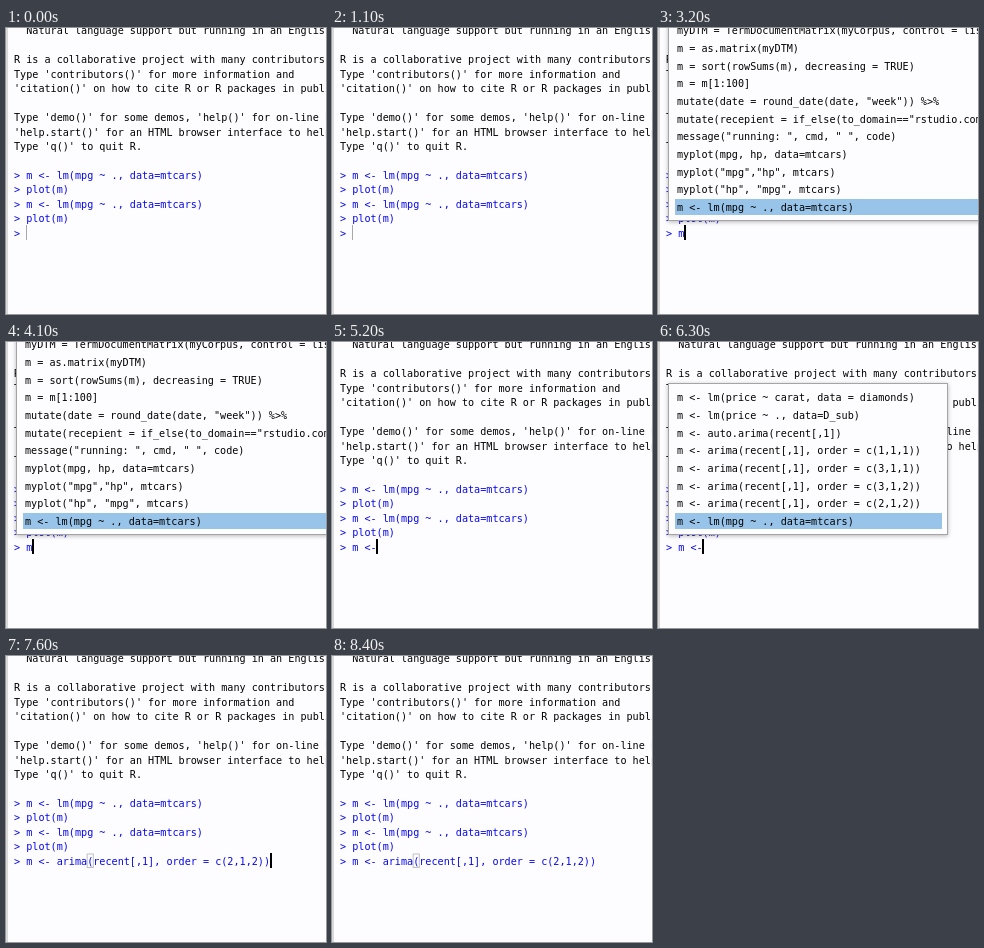
Write an HTML page that moves like this. It is 320 px wide and 286 px high and loops after 8500 ms.

```html
<!DOCTYPE html>
<html lang="en">
<head>
<meta charset="utf-8">
<title>Console history popup</title>
<style>
  html, body { margin: 0; width: 100%; height: 100%; overflow: hidden; background: #fdfdff; }
  svg { display: block; width: 320px; height: 286px; }
  text { font: 10.13px "DejaVu Sans Mono", monospace; white-space: pre; fill: #000; }
  .input { fill: #0808ee; }
  .panel { fill: #fdfdff; stroke: #a4a4a4; filter: drop-shadow(0 1px 2px rgba(0, 0, 0, .28)); }
  .selected { fill: #98c4ea; }
</style>
</head>
<body>
<svg id="stage" viewBox="0 0 320 286"></svg>
<script>
const LOOP = 8500, CHAR = 6.1, LEFT = 8, LINE = 14.45, PROMPT_Y = 208.7;
const ITEM = 17.66, LAST_ITEM_Y = 183;
const stage = document.getElementById('stage');

function add(parent, tag, attrs, content = '') {
  const node = document.createElementNS('http://www.w3.org/2000/svg', tag);
  for (const key in attrs) node.setAttribute(key, attrs[key]);
  node.textContent = content;
  parent.appendChild(node);
  return node;
}

const show = (node, visible) => { node.style.display = visible ? '' : 'none'; };

add(stage, 'rect', { width: 320, height: 286, fill: '#fdfdff' });
add(stage, 'rect', { width: 2, height: 286, fill: '#d9d9d9' });

const output = [
  '  Natural language support but running in an English locale',
  '',
  'R is a collaborative project with many contributors.',
  "Type 'contributors()' for more information and",
  "'citation()' on how to cite R or R packages in publications.",
  '',
  "Type 'demo()' for some demos, 'help()' for on-line help, or",
  "'help.start()' for an HTML browser interface to help.",
  "Type 'q()' to quit R.",
  '',
  '> m <- lm(mpg ~ ., data=mtcars)',
  '> plot(m)',
  '> m <- lm(mpg ~ ., data=mtcars)',
  '> plot(m)'
];
output.forEach((line, i) => add(stage, 'text', {
  x: LEFT,
  y: PROMPT_Y - (output.length - i) * LINE,
  class: line.startsWith('>') ? 'input' : ''
}, line));

const bracket = add(stage, 'rect', {
  x: LEFT + 12 * CHAR, y: 198, width: CHAR, height: 13.5,
  fill: 'none', stroke: '#c0c0c0'
});
const prompt = add(stage, 'text', { x: LEFT, y: PROMPT_Y, class: 'input' });
const cursor = add(stage, 'rect', { y: 197, height: 15 });

function makePopup(items, top, width) {
  const group = add(stage, 'g', {});
  add(group, 'rect', { class: 'panel', x: 10.5, y: top, width, height: 192.5 - top });
  const band = add(group, 'rect', { class: 'selected', x: 17, width: width - 12, height: 16 });
  items.forEach((item, i) => add(group, 'text', {
    x: 19, y: LAST_ITEM_Y - (items.length - 1 - i) * ITEM
  }, item));
  return { group, select: up => band.setAttribute('y', Math.round(171 - up * ITEM)) };
}

const popups = {
  all: makePopup([
    'myDTM = TermDocumentMatrix(myCorpus, control = list(',
    'm = as.matrix(myDTM)',
    'm = sort(rowSums(m), decreasing = TRUE)',
    'm = m[1:100]',
    'mutate(date = round_date(date, "week")) %>%',
    'mutate(recepient = if_else(to_domain=="rstudio.com"',
    'message("running: ", cmd, " ", code)',
    'myplot(mpg, hp, data=mtcars)',
    'myplot("mpg","hp", mtcars)',
    'myplot("hp", "mpg", mtcars)',
    'm <- lm(mpg ~ ., data=mtcars)'
  ], -10, 400),
  assigned: makePopup([
    'm <- lm(price ~ carat, data = diamonds)',
    'm <- lm(price ~ ., data=D_sub)',
    'm <- auto.arima(recent[,1])',
    'm <- arima(recent[,1], order = c(1,1,1))',
    'm <- arima(recent[,1], order = c(3,1,1))',
    'm <- arima(recent[,1], order = c(3,1,2))',
    'm <- arima(recent[,1], order = c(2,1,2))',
    'm <- lm(mpg ~ ., data=mtcars)'
  ], 41.5, 279)
};

// Each track lists [start ms, value]; values hold until the next entry.
const typed = [
  [0, ''], [2300, 'm'], [4700, 'm '], [4900, 'm <'], [5100, 'm <-'],
  [7400, 'm <- arima(recent[,1], order = c(2,1,2))']
];
const cursorColor = [
  [0, '#a8a8a8'], [700, ''], [1100, '#a8a8a8'], [1700, ''], [2000, '#a8a8a8'],
  [2400, ''], [2600, '#000'], [3300, ''], [3700, '#000'], [4300, ''], [4700, '#000'],
  [5700, ''], [5900, '#000'], [6500, ''], [6900, '#000'], [8100, '']
];
const openPopup = [[0, ''], [2700, 'all'], [4200, ''], [5900, 'assigned'], [7400, '']];
const selection = [[0, 0], [6700, 1]];
const at = (track, time) => track.findLast(([start]) => start <= time)[1];

const begin = performance.now();
function draw() {
  const time = (performance.now() - begin) % LOOP;
  const command = at(typed, time), color = at(cursorColor, time), open = at(openPopup, time);
  prompt.textContent = '> ' + command;
  cursor.setAttribute('x', Math.floor(LEFT + (command.length + 2) * CHAR));
  cursor.setAttribute('width', command ? 2 : 1);
  cursor.setAttribute('fill', color || 'none');
  show(bracket, time >= 7500);
  for (const name in popups) {
    show(popups[name].group, name === open);
    popups[name].select(at(selection, time));
  }
  requestAnimationFrame(draw);
}
draw();
</script>
</body>
</html>
```
